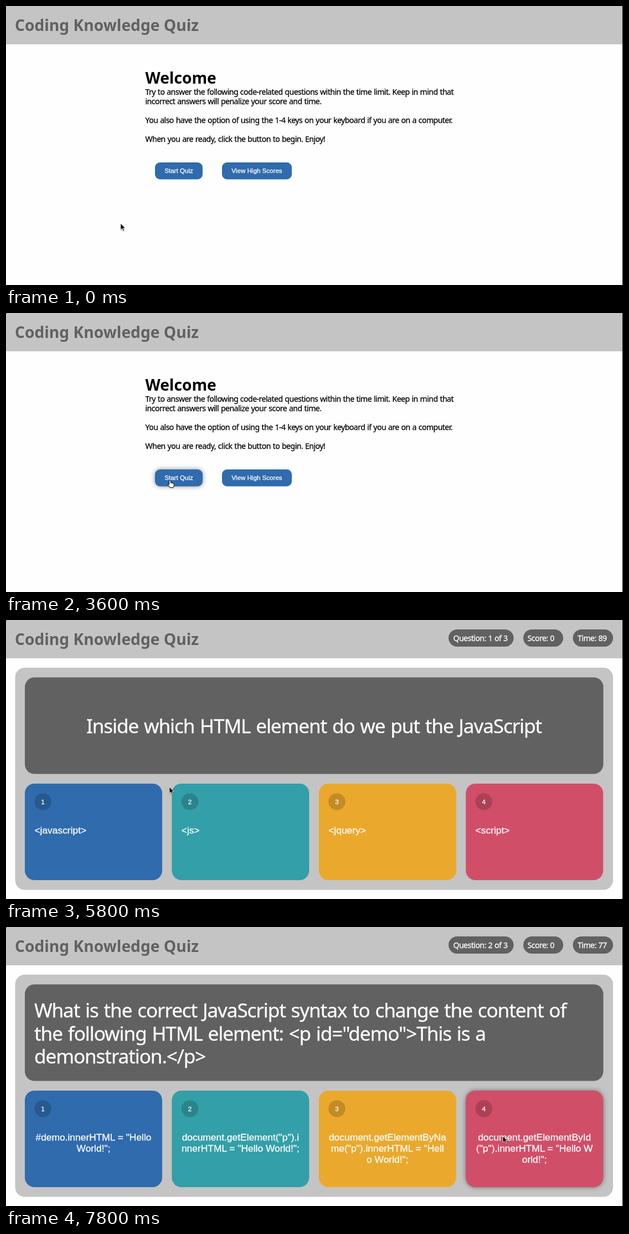
These frames come from a looping animation (1114x503 px, 8000 ms). An HTML page:

```html
<!DOCTYPE html>
<html lang="en">
<head>
<meta charset="utf-8">
<title>Coding Knowledge Quiz</title>
<style>
  html, body { margin: 0; width: 100%; height: 100%; overflow: hidden; background: #fefefe; }
  svg { display: block; width: 100vw; height: 100vh; }
  text { white-space: pre; }
  .body, .question { font-family: "Noto Sans", "Open Sans", sans-serif; word-spacing: .05em; }
  .body { font-size: 14.06px; letter-spacing: -.037em; stroke: #000; stroke-width: .25px; }
  .question { font-size: 35.1px; letter-spacing: -.031em; }
  .title { font: bold 28.2px "Noto Sans", "Open Sans", sans-serif; }
  .label { font: 11.6px "Liberation Sans", Arial, sans-serif; }
  .answer { font: 17.4px "Liberation Sans", Arial, sans-serif; }
  .light { fill: #fff; stroke: #fff; stroke-width: .3px; }
  .middle { text-anchor: middle; }
  .glow { filter: drop-shadow(0 0 4px rgba(0, 0, 0, .45)); }
  .cursor { filter: drop-shadow(0 1px 1px rgba(0, 0, 0, .3)); }
</style>
</head>
<body>
<svg viewBox="0 0 1114 503">
  <rect width="1113" height="69" fill="#c4c4c4"/>
  <text class="title" x="16" y="45" fill="#616161">Coding Knowledge Quiz</text>

  <g id="welcome">
    <text class="title" x="251.5" y="140">Welcome</text>
    <g class="body">
      <text x="251.5" y="160">Try to answer the following code-related questions within the time limit. Keep in mind that</text>
      <text x="251.5" y="177">incorrect answers will penalize your score and time.</text>
      <text x="251.5" y="211">You also have the option of using the 1-4 keys on your keyboard if you are on a computer.</text>
      <text x="251.5" y="245">When you are ready, click the button to begin. Enjoy!</text>
    </g>
    <g class="label middle">
      <rect id="start" x="269" y="282" width="86" height="30.5" rx="9" fill="#2f6bad"/>
      <text class="light" x="312" y="301">Start Quiz</text>
      <rect x="390" y="282" width="126" height="30.5" rx="9" fill="#2f6bad"/>
      <text class="light" x="453" y="301">View High Scores</text>
    </g>
  </g>

  <g id="quiz">
    <g fill="#616161">
      <rect x="799" y="17" width="117.5" height="31" rx="15.5"/>
      <rect x="934" y="17" width="72" height="31" rx="15.5"/>
      <rect x="1023.5" y="17" width="72.5" height="31" rx="15.5"/>
    </g>
    <g class="body light">
      <text id="progress" x="807.5" y="38"></text>
      <text x="941.5" y="38">Score: 0</text>
      <text id="time" x="1032" y="38"></text>
    </g>
    <rect x="16.5" y="86" width="1079.5" height="400.5" rx="17.4" fill="#c4c4c4"/>
    <rect x="34" y="103.5" width="1044.5" height="174" rx="17.4" fill="#616161"/>
    <g id="cards"></g>
    <g id="prompts"></g>
  </g>

  <rect x="1113" width="1" height="503"/>
  <rect id="corner" width="1" height="1"/>
  <g id="cursor" class="cursor" stroke-linejoin="round">
    <path id="arrow" d="M0 0V11.6L2.7 9.1L4.6 13.6L6.5 12.8L4.6 8.4H8.2Z" stroke="#fff" stroke-width=".8"/>
    <path id="hand" d="M-1.3 1Q0-.6 1.3 1V5L6.4 6.3Q7.5 6.8 7.2 9.6L6 13.5H.2L-3.6 8.8Q-3.8 7.3-2.5 7.5L-1.3 8.7Z"
      fill="#fff" stroke="#000" stroke-width=".9"/>
  </g>
</svg>
<script>
const LOOP = 8000, STEP = 200;
const QUIZ_START = 4800, NEXT_QUESTION = 7000;
const colors = ["#2f6bad", "#339fa8", "#eaa92d", "#d14e68"];
const questions = [
  { lines: ["Inside which HTML element do we put the JavaScript"],
    answers: [["<javascript>"], ["<js>"], ["<jquery>"], ["<script>"]] },
  { lines: ["What is the correct JavaScript syntax to change the content of",
            'the following HTML element: <p id="demo">This is a', "demonstration.<\/p>"],
    answers: [['#demo.innerHTML = "Hello', 'World!";'],
              ['document.getElement("p").i', 'nnerHTML = "Hello World!";'],
              ['document.getElementByNa', 'me("p").innerHTML = "Hell', 'o World!";'],
              ["document.getElementById", '("p").innerHTML = "Hello W', 'orld!";']] }
];
// time, x, y of the pointer
const track = [
  [0, 207, 392], [1800, 214, 388], [2000, 236, 378], [2200, 250, 371],
  [2600, 264, 347], [2800, 286, 305], [3000, 294, 302], [3200, 295, 301],
  [6000, 390, 312], [6200, 575, 337], [6400, 684, 349], [6600, 700, 357], [6800, 704, 360],
  [7200, 742, 364], [7400, 830, 372], [7600, 886, 377], [7800, 897, 377]
];
const timer = [[4800, "00"], [5800, "89"], [6800, "88"], [7000, "78"], [7800, "77"]];

const $ = id => document.getElementById(id);
const latest = (list, t) => list.filter(item => item[0] <= t).pop();
const show = (el, on) => el.setAttribute("visibility", on ? "visible" : "hidden");

function add(parent, tag, attrs, content = "") {
  const el = document.createElementNS("http://www.w3.org/2000/svg", tag);
  for (const name in attrs) el.setAttribute(name, attrs[name]);
  el.textContent = content;
  return parent.appendChild(el);
}

function addLines(parent, lines, attrs, lineHeight) {
  lines.forEach((line, i) =>
    add(parent, "text", { ...attrs, y: attrs.y + i * lineHeight }, line));
}

const cardX = i => 34 + i * 265.4;
const cards = colors.map((fill, i) => {
  const x = cardX(i);
  const card = add($("cards"), "rect", { x, y: 295, width: 248, height: 174, rx: 17.4, fill });
  add($("cards"), "circle", { cx: x + 32.6, cy: 327.5, r: 15.3, fill: "rgba(0,0,0,.17)" });
  add($("cards"), "text", { class: "label light middle", x: x + 32.6, y: 331.6 }, i + 1);
  return card;
});

const prompts = questions.map(({ lines, answers }) => {
  const group = add($("prompts"), "g", {});
  const single = lines.length === 1;
  addLines(group, lines, {
    class: "question light" + (single ? " middle" : ""),
    x: single ? 556 : 51, y: single ? 204 : 163
  }, 41.7);
  answers.forEach((answer, i) => {
    const wrapped = answer.length > 1;
    addLines(group, answer, {
      class: "answer light" + (wrapped ? " middle" : ""),
      x: cardX(i) + (wrapped ? 124 : 17.4), y: 384.5
    }, 20);
  });
  return group;
});

function draw(now) {
  const t = Math.floor(now % LOOP / STEP) * STEP;
  const playing = t >= QUIZ_START;
  const number = t >= NEXT_QUESTION ? 1 : 0;
  const [, x, y] = latest(track, t);
  const onStart = !playing && t >= 3000;

  $("welcome").style.display = playing ? "none" : "";
  $("quiz").style.display = playing ? "" : "none";
  show($("corner"), t >= 200);
  show($("arrow"), !onStart);
  show($("hand"), onStart);
  $("cursor").setAttribute("transform", `translate(${x + (onStart ? 1 : 0)} ${y})`);
  $("start").classList.toggle("glow", onStart);

  if (playing) {
    $("progress").textContent = `Question: ${number + 1} of 3`;
    $("time").textContent = "Time: " + latest(timer, t)[1];
    prompts.forEach((group, i) => show(group, i === number));
    cards.forEach((card, i) => card.classList.toggle("glow",
      y >= 305 && x >= cardX(i) && x <= cardX(i) + 248));
  }
  requestAnimationFrame(() => draw(performance.now() - origin));
}
const origin = performance.now();
draw(0);
</script>
</body>
</html>
```
